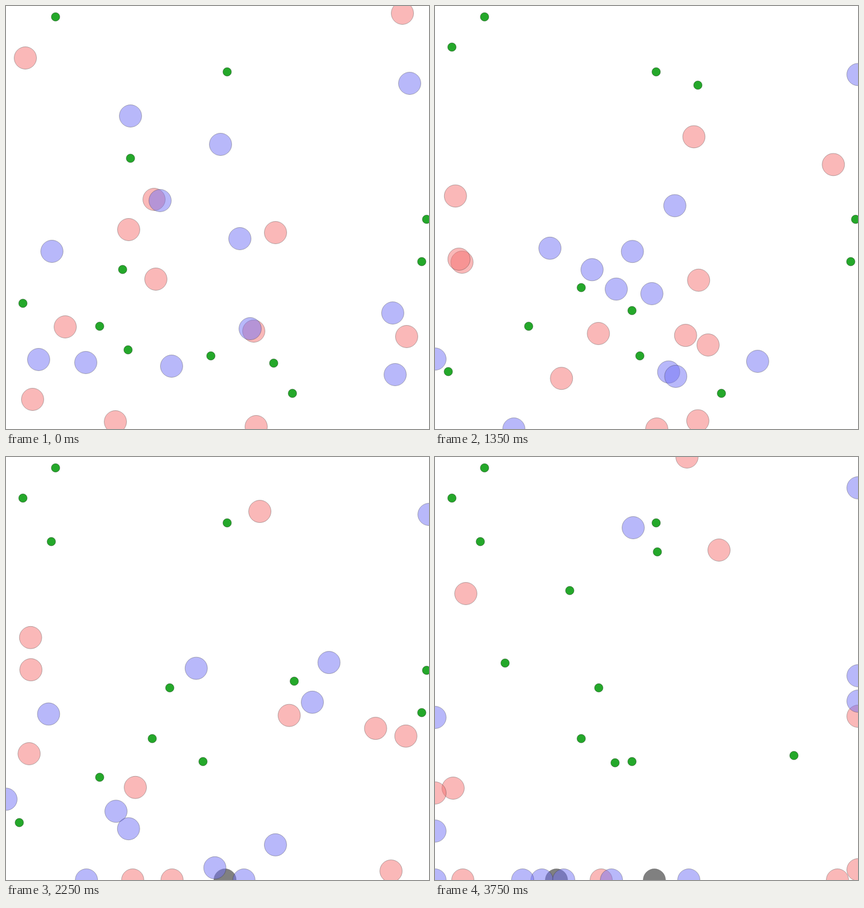
Write an HTML page with a canvas that moves like this. It is 700 px wide and 700 px high and loops after 3900 ms.

```html
<!DOCTYPE html>
<html lang="en">
<head>
<meta charset="utf-8">
<title>Foraging circles</title>
<style>
  html, body { margin: 0; width: 100%; height: 100%; overflow: hidden; background: #fff; }
  canvas { display: block; }
</style>
</head>
<body>
<canvas id="stage" width="700" height="700"></canvas>
<script>
const SIZE = 700, STEP_MS = 150, STEPS = 26;
const BODY = 18.5, CRUMB = 7, MEALS = 12;
const RED = 'rgba(245,115,115,.5)', BLUE = 'rgba(115,115,245,.5)', GREY = '#808080', GREEN = '#24a82a';
const ctx = document.getElementById('stage').getContext('2d');

// Everyone starts at rest and quickly reaches cruising speed.
const travel = step => step - 1.5 * (1 - 0.6 ** step);
const progress = step => travel(step) / travel(STEPS - 1);
const clamp = value => Math.max(0, Math.min(SIZE, value));

// Smooth curve through evenly timed values; three values give a parabola.
function curve(v, t) {
  const last = v.length - 1;
  const slope = i => v[i + 1] - v[i];
  const middle = i => (v[i + 1] - v[i - 1]) / 2;
  const tangent = i => {
    if (last === 1) return slope(0);
    if (i === 0) return 2 * slope(0) - middle(1);
    if (i === last) return 2 * slope(last - 1) - middle(last - 1);
    return middle(i);
  };
  const i = Math.min(Math.floor(t * last), last - 1), u = t * last - i, w = 1 - u;
  return v[i] + slope(i) * u * u * (3 - 2 * u) + u * w * (tangent(i) * w - tangent(i + 1) * u);
}

// Waypoints may lie beyond the walls: a mover that reaches a wall slides along it.
const walker = (color, waypoints, diesAt = STEPS) => ({
  color, diesAt,
  at: step => [0, 1].map(axis => clamp(curve(waypoints.map(p => p[axis]), progress(step))))
});

const movers = [
  walker(RED, [[656, 12], [666, 795]]),
  walker(RED, [[32, 86], [34, 324], [40, 558], [46, 825]]),
  walker(RED, [[245, 320], [271, 552], [275, 815], [275, 1100]]),
  walker(RED, [[203, 370], [210, 755], [201, 1140]], 23),
  walker(RED, [[446, 375], [422, 127], [417, -121]]),
  walker(RED, [[248, 452], [558, 451], [955, 429]]),
  walker(RED, [[98, 531], [50, 455], [42, 352], [40, 400], [30, 548]]),
  walker(RED, [[410, 538], [366, 710], [363, 1000], [363, 1300]], 15),
  walker(RED, [[663, 547], [273, 546], [-127, 556]]),
  walker(RED, [[44, 651], [40, 328], [51, 226]]),
  walker(RED, [[181, 688], [975, 683]]),
  walker(RED, [[414, 696], [465, 469], [470, 154]]),
  walker(BLUE, [[206, 182], [184, 531], [177, 918]]),
  walker(BLUE, [[355, 229], [356, 421], [360, 620], [293, 820], [213, 1010]]),
  walker(BLUE, [[668, 128], [1060, 101], [1450, 51]]),
  walker(BLUE, [[255, 322], [492, 337], [813, 362]]),
  walker(BLUE, [[387, 385], [391, 730], [420, 1075]]),
  walker(BLUE, [[76, 406], [456, 406], [770, 404]]),
  walker(BLUE, [[404, 534], [304, 447], [125, 428], [-60, 424], [-250, 431]]),
  walker(BLUE, [[640, 508], [472, 627], [292, 712]]),
  walker(BLUE, [[644, 610], [-124, 619]]),
  walker(BLUE, [[54, 585], [-196, 584], [-450, 573], [-700, 700]]),
  walker(BLUE, [[132, 590], [132, 980], [145, 1370]]),
  walker(BLUE, [[274, 596], [311, 386], [328, 117]])
];

// The first dozen spots hold food at once; each eaten piece regrows at the next spot.
const spots = [
  [82, 18], [366, 109], [206, 252], [696, 353], [688, 423], [193, 436],
  [28, 492], [155, 530], [202, 569], [339, 579], [443, 591], [474, 641],
  [28, 68], [186, 499], [326, 504], [435, 131], [22, 605], [242, 466],
  [75, 140], [271, 382], [477, 371], [368, 157], [116, 341],
  [223, 221], [298, 506], [594, 494]
];

function simulate() {
  let food = spots.slice(0, MEALS), next = MEALS;
  return Array.from({ length: STEPS }, (_, step) => {
    const bodies = movers.map(m => m.at(step));
    const touched = ([x, y]) => bodies.some(([bx, by]) => Math.hypot(x - bx, y - by) < BODY + CRUMB);
    food = food.map(spot => touched(spot) && next < spots.length ? spots[next++] : spot);
    return { bodies, food };
  });
}

function circle([x, y], radius, fill, stroke) {
  ctx.beginPath();
  ctx.arc(x, y, radius, 0, Math.PI * 2);
  ctx.fillStyle = fill;
  ctx.fill();
  ctx.strokeStyle = stroke;
  ctx.stroke();
}

const world = simulate();

function draw(step) {
  const { bodies, food } = world[step];
  ctx.fillStyle = '#fff';
  ctx.fillRect(0, 0, SIZE, SIZE);
  ctx.lineWidth = 0.8;
  for (const spot of food) circle(spot, CRUMB, GREEN, 'rgba(0,50,0,.6)');
  movers.forEach(({ color, diesAt }, i) => {
    circle(bodies[i], BODY, step >= diesAt ? GREY : color, 'rgba(40,40,40,.4)');
  });
}

const start = performance.now();
function tick() {
  draw(Math.floor((performance.now() - start) / STEP_MS) % STEPS);
  requestAnimationFrame(tick);
}
tick();
</script>
</body>
</html>
```
